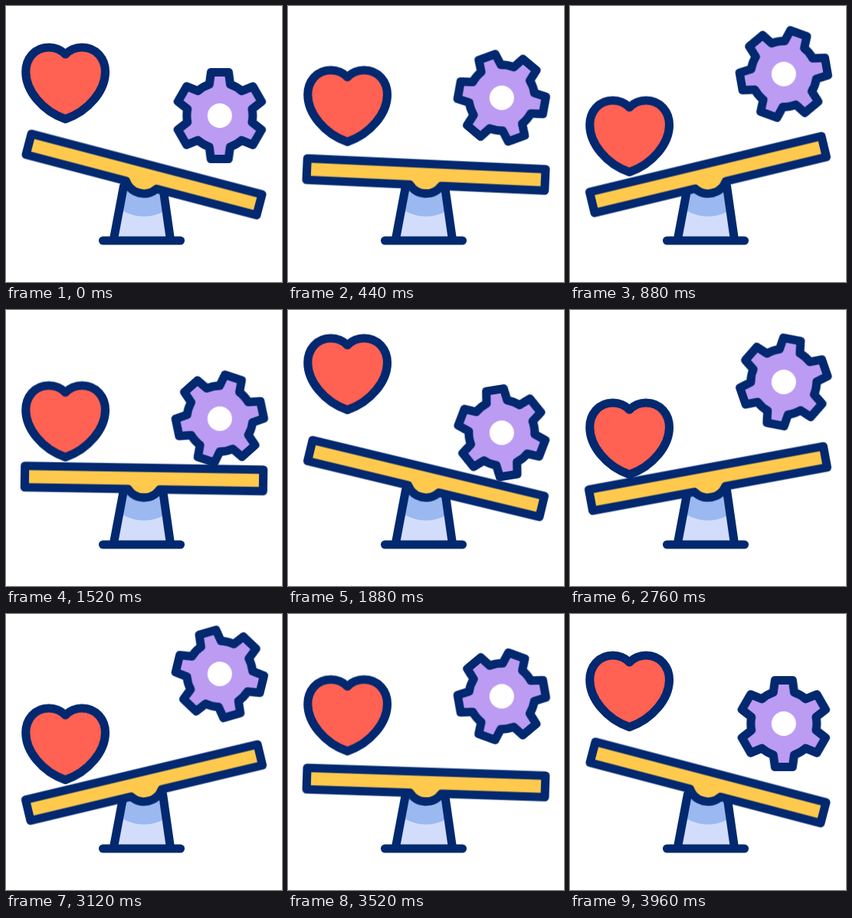
These frames come from a looping animation (360 px wide and 360 px high, 4 s). An HTML page:

```html
<!DOCTYPE html>
<html lang="en">
<head>
<meta charset="utf-8">
<title>Balance</title>
<style>
  html, body { margin: 0; width: 100%; height: 100%; overflow: hidden; background: #fff; }
  svg { display: block; width: 100%; height: 100%; }

  .line { stroke: #02286f; stroke-width: 11.1; stroke-linecap: round; stroke-linejoin: round; }

  #plank, #heart, #gear, #wheel { animation: 4s linear infinite; }
  #plank { animation-name: tilt; animation-timing-function: cubic-bezier(.333, 0, .667, 1); }
  #heart { animation-name: heart; }
  #gear { animation-name: gear; }
  #wheel { animation-name: spin; }

  @keyframes tilt {
    0%, 50%, 99%, 100% { transform: rotate(14.7deg); }
    25%, 75% { transform: rotate(-14.7deg); }
  }
  @keyframes heart {
    0% { transform: translateY(0); animation-timing-function: cubic-bezier(.333, 0, .667, 1); }
    25% { transform: translateY(72px); animation-timing-function: cubic-bezier(.67, 0, .75, 1); }
    50% { transform: translateY(-25px); animation-timing-function: cubic-bezier(.35, 0, .33, 1); }
    75% { transform: translateY(72px); animation-timing-function: cubic-bezier(.333, 0, .667, 1); }
    99%, 100% { transform: translateY(0); }
  }
  @keyframes gear {
    0% { transform: translateY(143px); animation-timing-function: cubic-bezier(.333, 0, .667, 1); }
    25% { transform: translateY(86.5px); animation-timing-function: cubic-bezier(.35, 0, .33, 1); }
    50% { transform: translateY(161px); animation-timing-function: cubic-bezier(.65, 0, .65, 1); }
    75% { transform: translateY(77px); animation-timing-function: cubic-bezier(.57, 0, .6, 1); }
    99%, 100% { transform: translateY(143px); }
  }
  @keyframes spin {
    0% { transform: rotate(0deg); }
    99%, 100% { transform: rotate(360deg); }
  }
</style>
</head>
<body>
<svg viewBox="0 0 360 360">
  <defs>
    <clipPath id="stand"><path d="M153.5 232 L140.5 306 H214 L203.5 232 Z"/></clipPath>
  </defs>

  <g clip-path="url(#stand)">
    <rect x="130" y="225" width="100" height="85" fill="#d2ddfb"/>
    <circle cx="180" cy="219.5" r="55" fill="#9bb8f0"/>
  </g>
  <path class="line" fill="none" d="M153.5 235 L140.3 305 M204.5 235 L214.5 305 M126.5 306 H227.5"/>

  <g transform="translate(180 219.8)">
    <path id="plank" class="line" fill="#ffc94d"
      d="M-155.5 -14 H155.5 V14 H20.5 A24.8 24.8 0 0 1 -20.5 14 H-155.5 Z"/>
  </g>

  <path id="heart" class="line" fill="#ff6152"
    d="M77.5 63 C84 56.5 92 54 99 54 C118 54 129.5 69 129.5 86
       C129.5 110 108 137 77.5 147.5 C47 137 25.8 110 25.8 86
       C25.8 69 37 54 56 54 C63 54 71 56.5 77.5 63 Z"/>

  <g transform="translate(278.8 0)">
    <g id="gear">
      <path id="wheel" class="line" fill="#bc9bf3"/>
      <circle r="16" fill="#fff"/>
    </g>
  </g>
</svg>
<script>
  const ROOT = 43, TIP = 57.6;

  function polar(radius, degrees) {
    const a = degrees * Math.PI / 180;
    return `${(radius * Math.sin(a)).toFixed(2)} ${(-radius * Math.cos(a)).toFixed(2)}`;
  }

  let outline = `M${polar(ROOT, -18.5)}`;
  for (let a = 0; a < 360; a += 60) {
    outline += `L${polar(TIP, a - 11.5)}L${polar(TIP, a + 11.5)}L${polar(ROOT, a + 18.5)}`
      + `A${ROOT} ${ROOT} 0 0 1 ${polar(ROOT, a + 41.5)}`;
  }
  document.getElementById('wheel').setAttribute('d', outline + 'Z');
</script>
</body>
</html>
```
